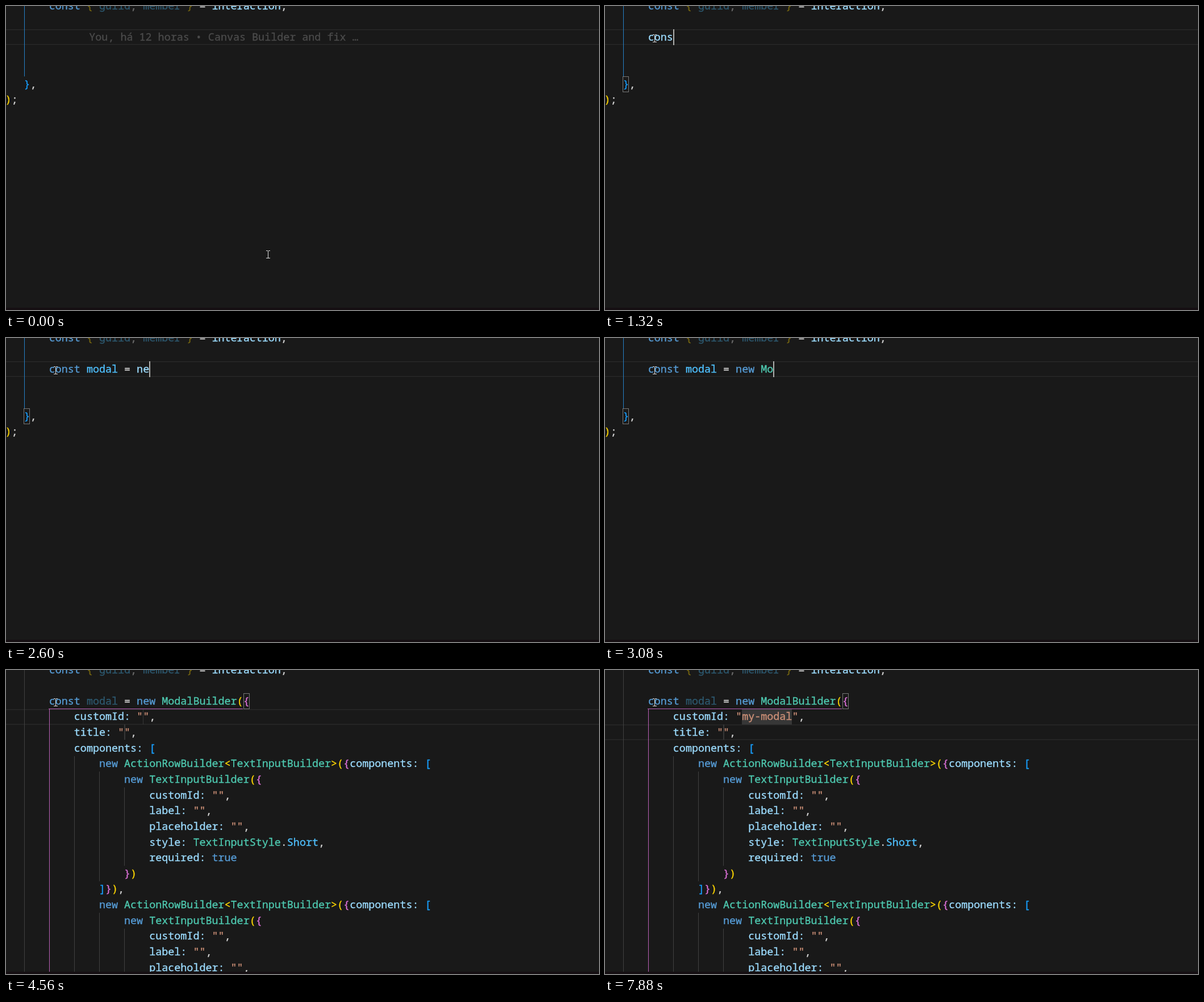
Write an HTML page with a canvas that moves like this. It is 1044 by 536 pixels and loops after 8 s.

```html
<!DOCTYPE html>
<html>
<head>
<meta charset="utf-8">
<style>
  html, body { margin: 0; overflow: hidden; background: #191919; }
  canvas { display: block; }
</style>
</head>
<body>
<canvas id="stage" width="1044" height="536"></canvas>
<script>
const ctx = document.getElementById('stage').getContext('2d');
const LOOP = 8000, LEFT = 75.7, CELL = 11.03, LINE = 27.64, TOP = 41;
const MONO = '"Noto Sans Mono", monospace';
const C = {
  back: '#191919', plain: '#d4d4d4', keyword: '#569cd6', key: '#9cdcfe', type: '#4ec9b0',
  constant: '#4fc1ff', string: '#ce9178', gold: '#ffd700', orchid: '#da70d6', blue: '#179fff',
  guide: '#404040', match: '#2aaaff', blame: '#4b4b4b'
};
const bracketColor = { '(': C.gold, ')': C.gold, '<': C.gold, '>': C.gold,
  '{': C.orchid, '}': C.orchid, '[': C.blue, ']': C.blue };

// Suggestions: [label, detail]; without a detail the row is a plain word.
const modalWord = ['ModalBuilder'], newModal = ['new.modal.djs', 'New Modal'];
const method = ['public method', 'Public Method Definition'];
const lists = {
  c: [['const'], ['components'], ['class', 'Class Definition'], ['ctor', 'Constructor'],
    ['createCanvas'], ['console'], ['command'], ['customId'], ['case'], ['catch'], ['continue']],
  const: [['const'], ['constructor'], ['const function', 'Const Function'], ['console'],
    ['new.constant.djs', 'New Constant'], ['import const', 'Import Constant'], ['constants'],
    ['export const', 'Export Constant'], ['const async', 'Async Constant'], ['const object', 'Const Object'], ['const enum']],
  m: [['member'], ['mde', 'moduleExports'], ['met', 'method'], modalWord, newModal,
    ['await.message.djs', 'Await a Message'], method, ['StringSelectMenuBuilder']],
  mod: [modalWord, newModal, method],
  modal: [modalWord, newModal],
  new: [['new'], newModal, ['new.embed.djs', 'New Embed'], ['new.button.djs', 'New Button'],
    ['new.row.djs', 'New Action Row'], ['new.select.djs', 'New Select Menu'],
    ['new.command.djs', 'New Command'], ['new.event.djs', 'New Event'],
    ['new.file.djs', 'New Attachment'], ['new.input.djs', 'New Text Input'], ['newPromise', 'New Promise']],
  Mod: [modalWord, ['modal'], newModal, method]
};

// [time, text, suggestion list, query]
const typing = [
  [0, ''], [840, 'c'], [920, 'c', 'c', 'c'], [1040, 'co'], [1120, 'co', 'c', 'co'],
  [1280, 'con'], [1320, 'cons'], [1360, 'const'], [1400, 'const', 'const', 'const'], [1480, 'const '],
  [1680, 'const m'], [1720, 'const m', 'm', 'm'], [1760, 'const mo'], [1800, 'const mod', 'mod', 'mod'],
  [1960, 'const moda'], [2040, 'const modal'], [2120, 'const modal', 'modal', 'modal'],
  [2240, 'const modal '], [2320, 'const modal ='], [2360, 'const modal = '],
  [2520, 'const modal = n'], [2600, 'const modal = ne'], [2680, 'const modal = new'],
  [2720, 'const modal = new', 'new', 'new'], [2920, 'const modal = new M', 'Mod', 'm'],
  [3080, 'const modal = new Mo'], [3200, 'const modal = new Mod', 'Mod', 'mod']
];
const idTyping = [[3600, ''], [5400, 'm'], [5600, 'my'], [6080, 'my-'], [6560, 'my-m'],
  [6720, 'my-mo'], [6760, 'my-mod'], [7000, 'my-moda'], [7120, 'my-modal']];

const rowBlock = [
  [8, 'new ActionRowBuilder<TextInputBuilder>({components: ['], [12, 'new TextInputBuilder({'],
  [16, 'customId: "",'], [16, 'label: "",'], [16, 'placeholder: "",'],
  [16, 'style: TextInputStyle.Short,'], [16, 'required: true'], [12, '})'], [8, ']}),']
];
const snippet = [[4, 'title: "",'], [4, 'components: ['], ...rowBlock, ...rowBlock.slice(0, 5)];

const colX = col => LEFT + col * CELL;
const rowY = row => TOP + row * LINE;
const latest = (steps, t) => steps.filter(step => step[0] <= t).pop();

function rect(x, y, w, h, color) {
  ctx.fillStyle = color;
  ctx.fillRect(Math.round(x), Math.round(y), w, h);
}

function frame(x, y, w, h, color) {
  ctx.strokeStyle = color;
  ctx.lineWidth = 1;
  ctx.strokeRect(Math.round(x) + .5, Math.round(y) + .5, w, h);
}

// A thin outline gives the text a medium weight.
function glyph(text, x, y) {
  ctx.fillText(text, x, y);
  ctx.strokeStyle = ctx.fillStyle;
  ctx.lineWidth = .35;
  ctx.strokeText(text, x, y);
}

// Monospaced text on a fixed character grid.
function write(text, x, baseline, color, cell = CELL, weight = '') {
  ctx.font = `${weight} ${cell / .6}px ${MONO}`;
  ctx.fillStyle = color;
  [...text].forEach((ch, i) => glyph(ch, x + i * cell, Math.round(baseline)));
}

function put(text, col, row, color, alpha = 1) {
  ctx.globalAlpha = alpha;
  write(text, colX(col), rowY(row) + 19.8, color);
  ctx.globalAlpha = 1;
}

function tokenColor(token) {
  if (token[0] === '"') return C.string;
  if (/^(const|new|true)$/.test(token)) return C.keyword;
  if (token === 'Short' || /^mo?d?a?l?$/.test(token)) return C.constant;
  if (/^[A-Z]/.test(token)) return C.type;
  return /^\w/.test(token) ? C.key : C.plain;
}

// Tokens beyond the column limit are still uncoloured, brackets excepted.
function code(text, col, row, limit = Infinity) {
  for (const { 0: token, index } of text.matchAll(/"[^"]*"|\w+:?|./g)) {
    const at = col + index;
    put(token, at, row, bracketColor[token] || (at < limit ? tokenColor(token) : C.plain));
  }
}

function lineHighlight(row) {
  rect(0, rowY(row), 1044, 1.5, '#292929');
  rect(0, rowY(row) + 26, 1044, 1.5, '#292929');
}

function guide(col, fromRow, toRow, color = C.guide) {
  rect(colX(col), rowY(fromRow), 1, (toRow - fromRow) * LINE, color);
}

function matched(label, query) {
  const low = label.toLowerCase(), whole = low.indexOf(query);
  const hits = new Set();
  let from = 0;
  [...query].forEach((ch, i) => {
    const at = whole < 0 ? low.indexOf(ch, from) : whole + i;
    hits.add(at);
    from = at + 1;
  });
  return hits;
}

function snippetIcon(x, y) {
  ctx.strokeStyle = '#cccccc';
  ctx.lineWidth = 1.4;
  ctx.beginPath();
  ctx.moveTo(x, y + 15);
  ctx.lineTo(x, y);
  ctx.lineTo(x + 15, y);
  ctx.lineTo(x + 15, y + 15);
  ctx.stroke();
  for (let i = 0; i < 16; i += 3) rect(x + i, y + 15, 2, 1.5, '#cccccc');
}

function popup(list, query, col) {
  const x = Math.round(colX(col)), y = 69, w = 542;
  const h = Math.round(Math.min(291, list.length * LINE + 5));
  ctx.save();
  ctx.beginPath();
  ctx.rect(x, y, w, h);
  ctx.clip();
  rect(x, y, w, h, '#202020');
  rect(x, y + 1, w, 28, '#2d2d2d');
  list.forEach(([label, detail], i) => {
    const top = y + 1 + i * LINE, base = top + 20.2, hits = matched(label, query);
    if (detail) {
      snippetIcon(x + 6.5, Math.round(top) + 6.5);
      write(detail, x + 529 - detail.length * 9.42, base - .7, '#989898', 9.42);
    } else {
      ctx.font = '11.5px "Open Sans", sans-serif';
      ctx.fillStyle = C.plain;
      glyph('abc', x + 5, Math.round(top + 17.5));
    }
    [...label].forEach((ch, j) => write(ch, x + 29 + j * CELL, base,
      hits.has(j) ? C.match : i ? C.plain : '#ffffff', CELL, hits.has(j) ? 'bold' : ''));
  });
  ctx.restore();
  frame(x, y, w - 1, h - 1, '#454545');
}

function caret(col, row) {
  rect(colX(col), rowY(row), 2, 28, '#aeafad');
}

function pointer(t) {
  const p = Math.min(1, Math.max(0, t / 520)), e = p * p * (3 - 2 * p);
  const x = Math.round(461 - 374 * e), y = Math.round(438 - 381 * e);
  rect(x, y - 6, 1, 13, '#dddddd');
  for (const dy of [-7, 6]) {
    rect(x - 3, y + dy, 3, 1, '#dddddd');
    rect(x + 1, y + dy, 3, 1, '#dddddd');
  }
}

function firstLine() {
  put('const', 0, -2, C.keyword);
  put('{', 6, -2, C.gold, .36);
  put('guild', 8, -2, C.constant, .33);
  put(',', 13, -2, C.plain, .4);
  put('member', 15, -2, C.constant, .33);
  put('}', 22, -2, C.gold, .36);
  put('=', 24, -2, C.plain);
  put('interaction', 26, -2, C.key);
  put(';', 37, -2, C.plain);
}

function typingScene(t) {
  const [, text, list, query] = latest(typing, t);
  lineHighlight(0);
  guide(-4, -2, 3, '#2580c8');
  firstLine();
  put('}', -4, 3, C.blue);
  put(',', -3, 3, C.plain);
  put(')', -7, 4, C.gold);
  put(';', -6, 4, C.plain);
  if (t < 840) put('You, há 12 horas • Canvas Builder and fix …', 6.4, 0, C.blame);
  code(text, 0, 0);
  if (t >= 480) {
    frame(31, 124, 10, 27, '#777777');
    caret(text.length, 0);
  }
  if (list) popup(lists[list], query, text.length);
}

function squiggle(x0, x1, y) {
  ctx.strokeStyle = '#f14c4c';
  ctx.lineWidth = 1.2;
  ctx.beginPath();
  for (let x = x0, i = 0; x <= x1; x += 3, i++) ctx.lineTo(x, y + (i % 2 ? -1.5 : 1.5));
  ctx.stroke();
}

function snippetScene(t) {
  const id = latest(idTyping, t)[1];
  const limit = t < 3680 ? -1 : t < 3840 ? 11.9 : Infinity;
  const onTitle = t >= 7360;
  lineHighlight(onTitle ? 2 : 1);
  guide(-4, -2, 18);
  guide(4, 4, 18);
  guide(8, 5, 12);
  guide(8, 14, 18);
  guide(12, 6, 11);
  guide(12, 15, 18);
  guide(0, 1, 18, '#b95fb6');
  rect(75, 68, 342, 1, '#b95fb6');
  rect(colX(15), rowY(1), Math.max(1, Math.round(id.length * CELL)), 27, '#373737');
  rect(colX(12), rowY(2), 2, 27, '#373737');

  firstLine();
  put('const', 0, 0, C.keyword);
  put('modal', 6, 0, C.constant, .33);
  code('= new ModalBuilder({', 12, 0, limit);
  if (t < 3840) squiggle(231, 307, 67);
  if (t >= 3680) frame(418, 41, 10, 27, '#777777');

  const idLine = `customId: "${id}",`;
  code(idLine, 4, 1, limit);
  if (t >= 5160 && t < 5480)
    put('You, há 1 segundo • Uncommitted changes', 4 + idLine.length + 6.4, 1, C.blame);
  snippet.forEach(([col, text], i) => code(text, col, i + 2, limit));

  const hidden = t >= 4560 && t < 5040 || t >= 7880;
  if (!hidden) onTitle ? caret(12, 2) : caret(15 + id.length, 1);
}

function draw(now) {
  const t = Math.floor(now % LOOP / 40) * 40;
  rect(0, 0, 1044, 536, C.back);
  (t < 3600 ? typingScene : snippetScene)(t);
  rect(0, 532, 1044, 4, '#150f12');
  pointer(t);
}

const start = performance.now();
function tick() {
  draw(performance.now() - start);
  requestAnimationFrame(tick);
}
tick();
</script>
</body>
</html>
```
